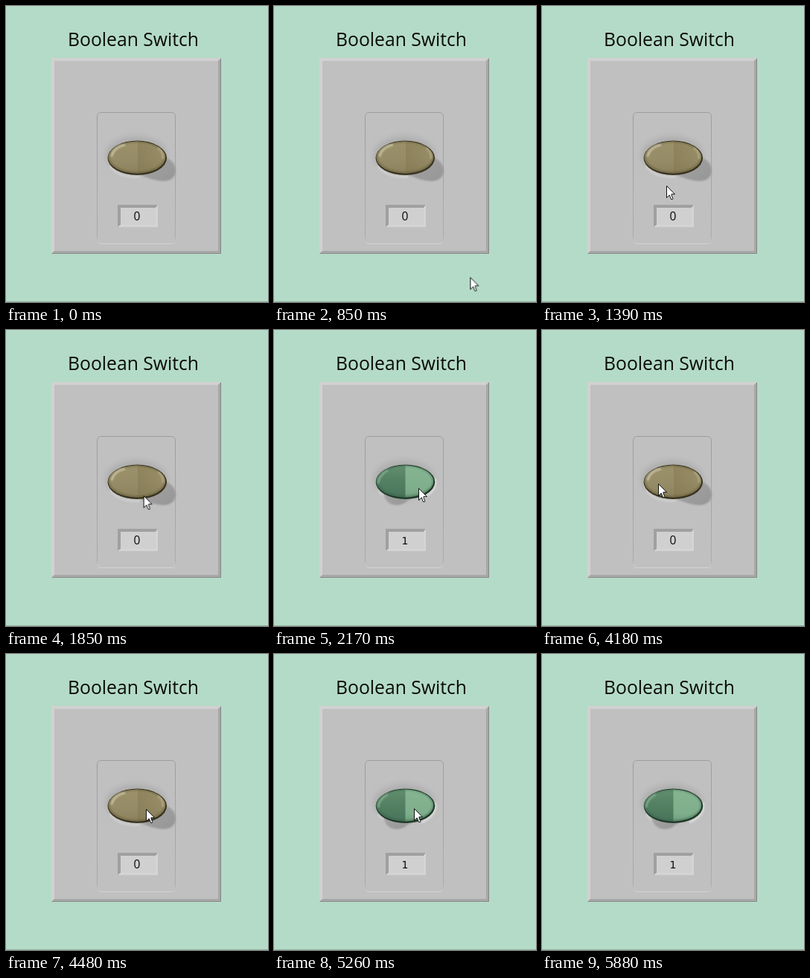
These frames come from a looping animation (352x399 px, 6.98 s). An HTML page:

```html
<!DOCTYPE html>
<html lang="en">
<head>
<meta charset="utf-8">
<title>Boolean Switch</title>
<style>
  html, body { margin: 0; width: 100%; height: 100%; overflow: hidden; background: #b4dbc7; }
  svg { display: block; width: 352px; height: 399px; }
  text { fill: #0a0a0a; font-family: "Open Sans", "Noto Sans", sans-serif; }
  .title { font-size: 24.7px; }
  .digit { font-size: 15.5px; text-anchor: middle; }
  .one { font-family: "DejaVu Sans", sans-serif; font-size: 14px; }

  .on, .off, .cursor { animation: 6980ms step-end infinite; }
  .on { animation-name: on; }
  .off { animation-name: off; }
  .cursor { animation-name: roam; }

  @keyframes on {
    0%, 50.85% { visibility: hidden; }
    31.08%, 67.76%, 100% { visibility: visible; }
  }
  @keyframes off {
    0%, 50.85% { visibility: visible; }
    31.08%, 67.76%, 100% { visibility: hidden; }
  }
  /* the pointer moves in discrete samples about 77 ms apart */
  @keyframes roam {
    0% { transform: translate(278px, 420px); }
    10.02% { transform: translate(278px, 385px); animation-timing-function: steps(6, end); }
    16.61% { transform: translate(190px, 268px); animation-timing-function: steps(3, end); }
    19.9% { transform: translate(167px, 242px); }
    21.05% { transform: translate(169px, 240px); animation-timing-function: steps(8, end); }
    29.79% { transform: translate(194px, 213px); }
    38.82% { transform: translate(189px, 212px); animation-timing-function: steps(3, end); }
    42.11% { transform: translate(167px, 206px); }
    44.26% { transform: translate(160px, 206px); }
    45.4% { transform: translate(157px, 207px); }
    48.7% { transform: translate(155px, 207px); }
    59.88% { transform: translate(156px, 207px); animation-timing-function: steps(4, end); }
    64.17% { transform: translate(188px, 209px); }
    75.35% { transform: translate(188px, 208px); animation-timing-function: steps(4, end); }
    79.79% { transform: translate(220px, 280px); animation-timing-function: steps(4, end); }
    84.23%, 100% { transform: translate(268px, 410px); }
  }
</style>
</head>
<body>
<svg viewBox="0 0 352 399">
  <defs>
    <filter id="soft" x="-30%" y="-30%" width="160%" height="160%"><feGaussianBlur stdDeviation="4"/></filter>
    <filter id="fine" x="-30%" y="-30%" width="160%" height="160%"><feGaussianBlur stdDeviation="0.9"/></filter>
    <clipPath id="face"><ellipse cx="175.8" cy="204" rx="38.4" ry="21.4"/></clipPath>
    <linearGradient id="tan" x1="0" y1="0" x2="0" y2="1">
      <stop offset="0" stop-color="#9a9069"/><stop offset=".5" stop-color="#968c67"/><stop offset="1" stop-color="#8a805b"/>
    </linearGradient>
    <linearGradient id="fold">
      <stop offset="0" stop-color="#7d7148" stop-opacity=".4"/><stop offset="1" stop-color="#7d7148" stop-opacity="0"/>
    </linearGradient>
    <linearGradient id="dark" x1="0" y1="0" x2="0" y2="1">
      <stop offset="0" stop-color="#63906f"/><stop offset=".5" stop-color="#527e61"/><stop offset="1" stop-color="#47725a"/>
    </linearGradient>
    <linearGradient id="light" x1="0" y1="0" x2="0" y2="1">
      <stop offset="0" stop-color="#86b592"/><stop offset=".7" stop-color="#7fae8c"/><stop offset="1" stop-color="#6c9b7a"/>
    </linearGradient>
    <linearGradient id="shade" x1="0" y1="0" x2="1" y2="1">
      <stop offset="0" stop-color="#a4a4a4"/><stop offset="1" stop-color="#969696"/>
    </linearGradient>
    <linearGradient id="rim" x1="0" y1="0" x2="0" y2="1">
      <stop offset="0" stop-color="#9c9c9c"/><stop offset=".95" stop-color="#acacac"/><stop offset="1" stop-color="#d4d4d4"/>
    </linearGradient>
  </defs>

  <rect width="352" height="399" fill="#b4dbc7"/>
  <rect y="398" width="352" height="1" fill="#8fb3a1"/>
  <text class="title" x="83" y="54">Boolean Switch</text>

  <!-- raised panel -->
  <rect x="61" y="70" width="228" height="264" fill="#c0c0c0"/>
  <path d="M61 70H289L285 74H65V330L61 334Z" fill="#d1d1d1"/>
  <path d="M289 70V334H61L65 330H285V74Z" fill="#a8a8a8"/>
  <path d="M288.5 71V333.5H62" fill="none" stroke="#868686"/>

  <!-- engraved frame -->
  <rect x="122.5" y="143.5" width="105" height="177" rx="5" fill="none" stroke="url(#rim)"/>

  <ellipse cx="175" cy="201" rx="41" ry="25" fill="#acacac" filter="url(#soft)"/>
  <path d="M140 216C148 228 164 231 180 230" fill="none" stroke="#d0d0d0" stroke-width="3" filter="url(#fine)"/>

  <g class="off">
    <path d="M180 227C190 232 202 236 211 236C222 236 228 230 228 222C228 213 221 206 212 203Z" fill="url(#shade)" filter="url(#fine)"/>
    <ellipse cx="176.3" cy="204.8" rx="39.8" ry="23.2" fill="#39331f"/>
    <g clip-path="url(#face)">
      <rect x="136" y="181" width="80" height="48" fill="url(#tan)"/>
      <rect x="177" y="181" width="38" height="48" fill="url(#fold)"/>
      <ellipse cx="176" cy="203.6" rx="38" ry="21" fill="none" stroke="#5b5233" stroke-width="2" opacity=".6" filter="url(#fine)"/>
      <path d="M142 203C143 195 150 189 160 187" fill="none" stroke="#d6d0b4" stroke-width="3" opacity=".75" filter="url(#fine)"/>
      <path d="M204 191C210 195 212 200 211 206" fill="none" stroke="#cac29f" stroke-width="2.4" opacity=".65" filter="url(#fine)"/>
    </g>
    <text class="digit" x="176" y="289">0</text>
  </g>

  <g class="on">
    <path d="M147 221C149 230 156 236 165 236C173 236 178 232 184 227Z" fill="url(#shade)" filter="url(#fine)"/>
    <path d="M216 200C219 209 214 220 198 227" fill="none" stroke="#dedede" stroke-width="3" filter="url(#fine)"/>
    <ellipse cx="176.5" cy="204.8" rx="39.8" ry="23.2" fill="#203a29"/>
    <g clip-path="url(#face)">
      <rect x="136" y="181" width="41" height="48" fill="url(#dark)"/>
      <rect x="176.5" y="181" width="41" height="48" fill="url(#light)"/>
      <ellipse cx="176" cy="203.6" rx="38" ry="21" fill="none" stroke="#31563f" stroke-width="2" opacity=".5" filter="url(#fine)"/>
      <path d="M140 207C140 200 145 193 153 189" fill="none" stroke="#a9d0b3" stroke-width="2.4" opacity=".6" filter="url(#fine)"/>
    </g>
  </g>

  <!-- readout -->
  <rect x="150" y="268" width="54" height="30" fill="#d0d0d0"/>
  <path d="M150 268H204L201 272H154V295L150 298Z" fill="#a0a0a0"/>
  <path d="M204 268V298H150L154 295H201V272Z" fill="#d4d4d4"/>
  <text class="digit off" x="176" y="289">0</text>
  <text class="digit one on" x="176" y="289">1</text>

  <path class="cursor" d="M.5 .5V16.5L4.2 12.9L6.5 18.5H8.4L8.8 17.5L6.9 12.7V11.7H11.5Z" fill="#fff" stroke="#111"/>
</svg>
</body>
</html>
```
